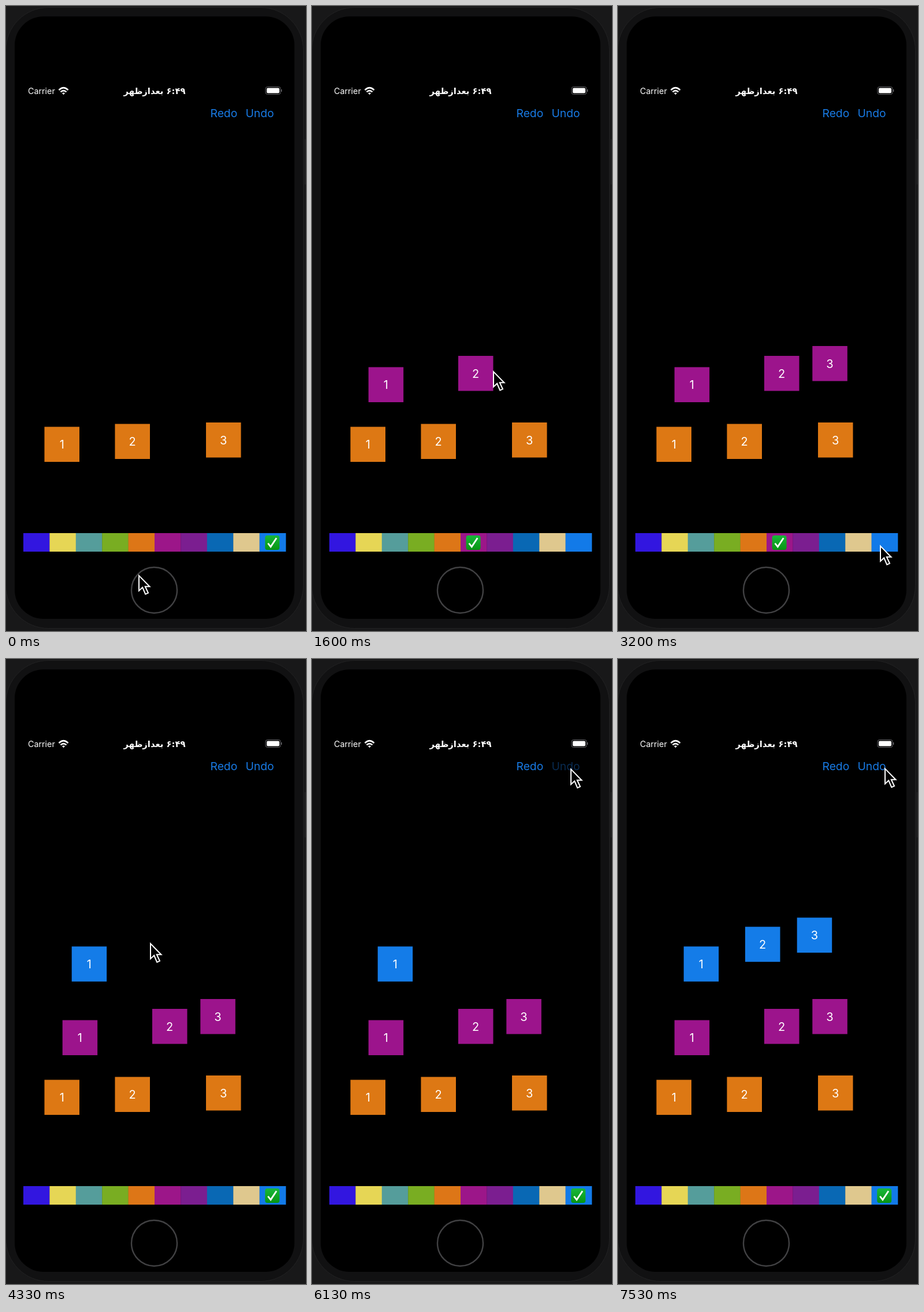
Recreate the animation shown at these times as an HTML page. Size 519 by 1079 pixels, loop 7.59 s.

```html
<!DOCTYPE html>
<html lang="en">
<head>
<meta charset="utf-8">
<style>
  html, body { margin: 0; width: 100%; height: 100%; overflow: hidden; background: #000; }
  svg { display: block; }
  text { font-family: Inter, Roboto, sans-serif; fill: #fff; }
  .action { font-size: 19.3px; fill: #187ae4; }
  .digit { font-size: 20px; text-anchor: middle; }
  .clock { font: bold 14.8px 'DejaVu Sans', sans-serif; text-anchor: middle; direction: rtl; }
</style>
</head>
<body>
<svg width="519" height="1079" viewBox="0 0 519 1079">
  <defs>
    <linearGradient id="green" x2="0" y2="1">
      <stop stop-color="#18b83a"/><stop offset="1" stop-color="#079512"/>
    </linearGradient>
  </defs>

  <rect width="519" height="1079" fill="#181819"/>
  <rect x="-.5" y="2.5" width="515" height="1072" rx="74" fill="#111112" stroke="#222223"/>
  <rect x="15" y="18" width="484" height="1040" rx="50"/>
  <path d="M517.5 230v78" stroke="#222224" stroke-width="2"/>
  <circle cx="256.5" cy="1008.5" r="39.5" fill="none" stroke="#414143" stroke-width="2.4"/>

  <text x="38" y="152" font-size="14.3">Carrier</text>
  <g fill="none" stroke="#fff" stroke-width="2.6">
    <path d="M91.5 145.2q8-8 16 0M94.5 148.4q5-4.6 10 0"/>
    <path d="M97 150.6q2.5-2 5 0l-2.5 2.6z" fill="#fff" stroke="none"/>
  </g>
  <text class="clock" x="257" y="151.5">۶:۴۹ بعدازظهر</text>
  <rect x="449" y="139.5" width="26" height="13" rx="3.5" fill="none" stroke="#66666a"/>
  <rect x="451" y="141.5" width="22" height="9" rx="2" fill="#fff"/>
  <path d="M476.5 144v4" stroke="#66666a" stroke-width="1.5"/>

  <text class="action" id="redo" x="353.5" y="192">Redo</text>
  <text class="action" id="undo" x="414.5" y="192">Undo</text>

  <g id="palette"></g>
  <g id="boxes"></g>
  <g id="check">
    <rect x="-12.5" y="-12.5" width="25" height="25" rx="4" fill="url(#green)"/>
    <path d="M-7.5 1L-2.8 7L7.2-8" fill="none" stroke="#fff" stroke-width="2.8"/>
  </g>
  <path id="cursor" d="M1 2.4V28.5L7.2 22.8L12.2 34.5L17 32.3L11.8 21.3H19.5Z" stroke="#fff" stroke-width="2"/>
</svg>
<script>
const LOOP = 7590, FRAME = 1000 / 15;
const byId = id => document.getElementById(id);

function add(parent, tag, attributes, text = '') {
  const node = document.createElementNS('http://www.w3.org/2000/svg', tag);
  for (const key in attributes) node.setAttribute(key, attributes[key]);
  node.textContent = text;
  return parent.appendChild(node);
}

const SWATCH = 45.4;
const swatches = ['#3216e0', '#e6d655', '#559d9b', '#79ad22', '#dd7617',
                  '#9c1689', '#7b1e90', '#0968b4', '#dfc88e', '#127ae8'];
swatches.forEach((fill, i) => add(byId('palette'), 'rect',
  { x: 30 + i * SWATCH, y: 910, width: SWATCH + .3, height: 32, fill }));

// Each box: fill, digit, left, top, then the spans during which it is shown.
const ORANGE = '#dd7814', PURPLE = '#9c148c', BLUE = '#147ce8';
const boxes = [
  [ORANGE, 1, 66.5, 726.5, [0, LOOP]],
  [ORANGE, 2, 188.5, 721.5, [0, LOOP]],
  [ORANGE, 3, 346, 719, [0, LOOP]],
  [PURPLE, 1, 97.7, 623.5, [1000, LOOP]],
  [PURPLE, 2, 253, 604, [1500, LOOP]],
  [PURPLE, 3, 336.3, 587, [1930, LOOP]],
  [BLUE, 1, 113.7, 496.3, [3900, 6190], [6600, LOOP]],
  [BLUE, 2, 220, 462.3, [4390, 5990], [6800, LOOP]],
  [BLUE, 3, 309.7, 446.5, [4760, 5790], [7000, LOOP]]
].map(([fill, digit, x, y, ...spans]) => {
  const node = add(byId('boxes'), 'g', { transform: `translate(${x} ${y})` });
  add(node, 'rect', { width: 60.5, height: 60.5, fill });
  add(node, 'text', { class: 'digit', x: 30.2, y: 37.5 }, digit);
  return { node, spans };
});

// Pointer stops: time, x, y.
const stops = [
  [0, 229, 981], [400, 277, 925], [530, 277, 925], [930, 127, 652], [1060, 127, 652],
  [1400, 283, 633], [1530, 283, 633], [1600, 313, 629], [1800, 366, 616], [2070, 366, 616],
  [2600, 400, 760], [3200, 453, 930], [3400, 453, 930], [3800, 144, 525], [3990, 144, 525],
  [4330, 249, 489], [4460, 249, 489], [4680, 340, 476], [4860, 340, 476],
  [5330, 390, 194], [5550, 447, 188], [6230, 447, 188], [6480, 377, 187],
  [7080, 377, 187], [7530, 461, 187], [LOOP, 461, 187]
];

const presses = { undo: [5700, 5900, 6100], redo: [6510, 6710, 6910] };

function pointerAt(t) {
  const i = Math.max(1, stops.findIndex(stop => stop[0] >= t));
  const [t0, x0, y0] = stops[i - 1], [t1, x1, y1] = stops[i];
  const p = (t - t0) / (t1 - t0), eased = p * p * (3 - 2 * p);
  return [x0 + (x1 - x0) * eased, y0 + (y1 - y0) * eased];
}

function draw(now) {
  const t = Math.floor((now % LOOP) / FRAME + .1) * FRAME;
  const within = ([start, end]) => t >= start && t < end;
  for (const { node, spans } of boxes)
    node.style.display = spans.some(within) ? '' : 'none';
  for (const id in presses)
    byId(id).style.opacity = presses[id].some(start => within([start, start + 95])) ? .35 : 1;
  const selected = within([460, 3310]) ? 5 : 9;
  byId('check').setAttribute('transform', `translate(${30 + (selected + .5) * SWATCH - .6} 926.5)`);
  byId('cursor').setAttribute('transform', `translate(${pointerAt(t)})`);
  requestAnimationFrame(draw);
}
requestAnimationFrame(draw);
</script>
</body>
</html>
```
